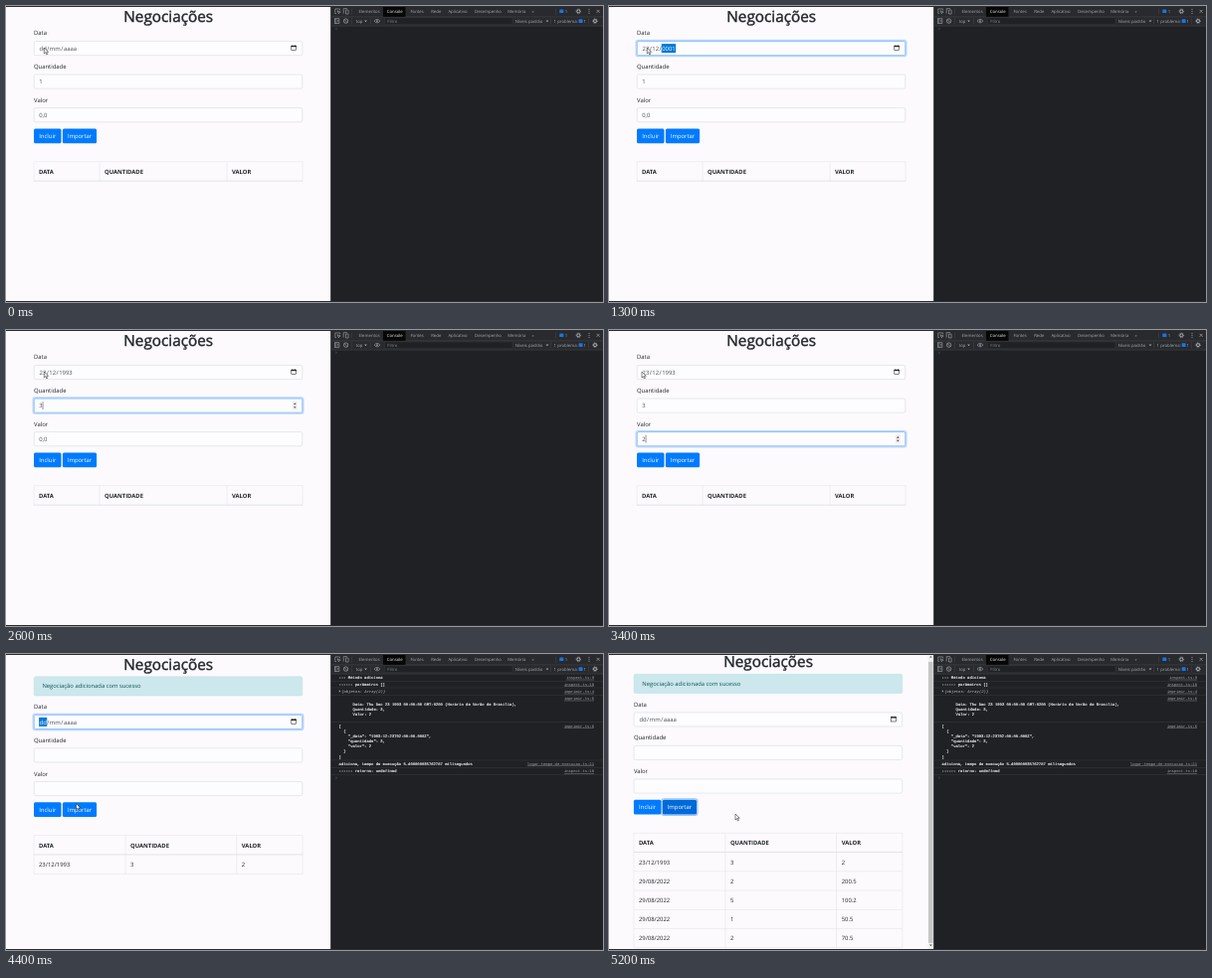
These frames come from a looping animation (600 by 298 pixels, 5.3 s). An HTML page:

```html
<!DOCTYPE html>
<html lang="pt-BR">
<head>
<meta charset="utf-8">
<title>Negociações</title>
<style>
  html, body { margin: 0; width: 100%; height: 100%; overflow: hidden; background: #fcfafd; }
  svg { display: block; width: 600px; height: 298px; }
  text { font-family: "Open Sans", "Noto Sans", sans-serif; white-space: pre; text-rendering: geometricPrecision; }
  .mono { font-family: "Liberation Mono", "DejaVu Sans Mono", monospace; }
  .log { stroke: #dcdee0; stroke-width: .18px; }
  .title { stroke: #212529; stroke-width: .4px; }
</style>
</head>
<body>
<svg id="stage" viewBox="0 0 600 298"></svg>
<script>
const LOOP = 5300, STEP = 100;
const stage = document.getElementById('stage');
const pen = document.createElement('canvas').getContext('2d');

// Time tables: the last entry whose time has come is in force.
const DATES = [
  [0, ['dd', 'mm', 'aaaa'], -1], [100, ['dd', 'mm', 'aaaa'], 0],
  [400, ['02', 'mm', 'aaaa'], 0], [600, ['23', 'mm', 'aaaa'], 1],
  [800, ['23', '01', 'aaaa'], 1], [900, ['23', '12', 'aaaa'], 2],
  [1100, ['23', '12', '0001'], 2], [1500, ['23', '12', '0019'], 2],
  [1700, ['23', '12', '0199'], 2], [1800, ['23', '12', '1993'], 2],
  [2000, ['23', '12', '1993'], -1], [4000, ['dd', 'mm', 'aaaa'], 0],
  [4600, ['dd', 'mm', 'aaaa'], -1]
];
// time, text, decoration
const AMOUNT = [[0, '1'], [2100, '1', 'selected'], [2400, '3', 'caret'], [2800, '3'], [4000, '']];
const PRICE = [[0, '0,0'], [2900, '0,0', 'selected'], [3400, '2', 'caret'], [3800, '2'], [4000, '']];
const FOCUS = [[0, ''], [100, 'date'], [2000, 'amount'], [2800, 'price'], [3950, 'date'], [4600, 'import']];
const ADD_FILL = [[0, '#007bff'], [3800, '#0069d9'], [3900, '#0062cc'], [4100, '#007bff']];
const IMPORT_FILL = [[0, '#007bff'], [4500, '#0069d9'], [4600, '#0062cc'], [4800, '#0069d9']];
const POINTER = [[0, 'arrow'], [3600, 'beam'], [3700, 'arrow'], [3800, 'hand'], [4000, 'beam'],
  [4200, 'arrow'], [4500, 'hand'], [4900, 'arrow']];
const PATH = [[0, 38.3, 42], [3300, 38.3, 42], [3400, 33, 42], [3500, 34, 60], [3600, 38, 95],
  [3700, 43, 122], [3800, 45, 129.8], [4100, 45, 129.8], [4500, 79, 157.5], [4700, 79, 157.5],
  [5200, 127, 161], [LOOP, 127, 161]];
const ROWS = [['23/12/1993', '3', '2'], ['29/08/2022', '2', '200.5'], ['29/08/2022', '5', '100.2'],
  ['29/08/2022', '1', '50.5'], ['29/08/2022', '2', '70.5']];

const clamp = v => Math.max(0, Math.min(1, v));
const at = (list, t) => list.filter(e => e[0] <= t).pop();

function along(path, t) {
  const i = Math.max(1, path.findIndex(p => p[0] > t));
  const a = path[i - 1], b = path[i], k = (t - a[0]) / (b[0] - a[0]);
  return [a[1] + (b[1] - a[1]) * k, a[2] + (b[2] - a[2]) * k];
}

const rect = (x, y, w, h, fill, more = '') =>
  `<rect x="${x}" y="${y}" width="${w}" height="${h}" fill="${fill}" ${more}/>`;
const text = (x, y, s, size = 5.9, fill = '#212529', more = '') =>
  `<text x="${x}" y="${y}" font-size="${size}" fill="${fill}" ${more}>${s}</text>`;
const path = (d, stroke, width = 0.6, fill = 'none') =>
  `<path d="${d}" stroke="${stroke}" stroke-width="${width}" fill="${fill}"/>`;
const circle = (x, y, r, stroke, width, fill = 'none') =>
  `<circle cx="${x}" cy="${y}" r="${r}" stroke="${stroke}" stroke-width="${width}" fill="${fill}"/>`;
const group = (x, y, body) => `<g transform="translate(${x} ${y})">${body}</g>`;

function textWidth(s) {
  pen.font = '100px "Open Sans", "Noto Sans", sans-serif';
  return pen.measureText(s).width * 0.059;
}

// How far the focus glow of a field has faded in or out.
function glow(name, t) {
  const i = FOCUS.findLastIndex(e => e[0] <= t);
  const k = clamp((t - FOCUS[i][0]) / 150);
  if (FOCUS[i][1] === name) return k;
  return i && FOCUS[i - 1][1] === name ? 1 - k : 0;
}

const halo = (x, y, w, h, k) =>
  rect(x - 0.8, y - 0.8, w + 1.6, h + 1.6, 'none', `rx="2" stroke="#007bff" stroke-width="1.3" opacity="${0.27 * k}"`);

function box(y, k) {
  return halo(28, y, 270, 14.6, k) +
    rect(28.2, y + 0.2, 269.6, 14.2, '#fdfcfe', 'rx="1.5" stroke="#ced4da" stroke-width=".5"') +
    rect(28.2, y + 0.2, 269.6, 14.2, 'none', `rx="1.5" stroke="#70b5ff" stroke-width=".7" opacity="${k}"`);
}

function dateField(t) {
  const [, parts, chosen] = at(DATES, t), y = 35.3;
  let x = 33.1, out = box(y, glow('date', t));
  parts.forEach((s, i) => {
    const w = textWidth(s) + 0.9, on = i === chosen;
    if (on) out += rect(x, y + 2.8, w, 9, '#0078d7');
    out += text(x + 0.45, y + 9.5, s, 5.9, on ? '#fff' : '#495057');
    x += w;
    if (i < 2) out += text(x, y + 9.5, '/', 5.9, '#495057');
    x += textWidth('/');
  });
  const icon = rect(286.8, y + 4.9, 4.9, 4.5, 'none', 'stroke="#222" stroke-width=".55"') +
    rect(286.6, y + 4.6, 5.3, 1.3, '#222') + rect(287.6, y + 4, 0.6, 0.8, '#222') + rect(290.3, y + 4, 0.6, 0.8, '#222');
  return out + icon;
}

function numberField(y, list, name, t, hover) {
  const [, s, mark] = at(list, t), w = textWidth(s);
  let out = box(y, glow(name, t));
  if (mark === 'selected') out += rect(33.2, y + 2.8, w, 9, '#0078d7');
  out += text(33.2, y + 9.5, s, 5.9, mark === 'selected' ? '#fff' : '#495057');
  if (mark === 'caret') out += rect(33.4 + w, y + 3.3, 0.5, 8, '#333');
  if (hover || at(FOCUS, t)[1] === name)
    out += rect(287.8, y + 3, 5, 8.6, '#ededee') +
      path(`M289 ${y + 6.3}l1.3 -1.6 1.3 1.6zM289 ${y + 8.4}l1.3 1.6 1.3 -1.6z`, 'none', 0, '#444');
  return out;
}

function button(x, w, label, fill, k) {
  return halo(x, 123.4, w, 14.8, k * 1.5) + rect(x, 123.4, w, 14.8, fill, 'rx="1.5"') +
    text(x + w / 2, 133, label, 5.9, '#fff', 'text-anchor="middle"');
}

function table(rows) {
  const top = 156.6, cols = rows.length ? [28, 120, 231.8, 298] : [28, 94, 222, 298];
  const head = 19.9, line = 19.15, h = head + rows.length * line;
  const rule = '#dee2e6';
  let out = '';
  for (const x of cols) out += rect(x - 0.2, top, 0.5, h, rule);
  out += rect(28, top, 270, 0.5, rule) + rect(28, top + head - 0.8, 270, 0.9, rule);
  ['DATA', 'QUANTIDADE', 'VALOR'].forEach((s, i) =>
    out += text(cols[i] + 5, top + 12.4, s, 5.85, '#212529', 'font-weight="700"'));
  rows.forEach((row, r) => {
    const y = top + head + r * line;
    row.forEach((s, i) => out += text(cols[i] + 5, y + 11.9, s));
    out += rect(28, y + line - 0.3, 270, 0.5, rule);
  });
  return out;
}

function page(t) {
  const added = t >= 4000, loaded = t >= 4700;
  const rows = loaded ? ROWS : added ? ROWS.slice(0, 1) : [];
  const scroll = 2.5 * clamp((t - 4900) / 300);
  const form = text(28, 29.4, 'Data') + dateField(t) +
    text(28, 63.2, 'Quantidade') + numberField(68.8, AMOUNT, 'amount', t) +
    text(28, 96.8, 'Valor') + numberField(102.4, PRICE, 'price', t, t === 4000 || t === 4100) +
    button(28, 27.5, 'Incluir', at(ADD_FILL, t)[1], 0) +
    button(56.9, 34.2, 'Importar', at(IMPORT_FILL, t)[1], glow('import', t)) + table(rows);
  let body = text(163.2, 15.8, 'Negociações', 15.3, '#212529', 'class="title" text-anchor="middle"');
  if (added)
    body += rect(28.2, 22.8, 269.6, 19.2, '#cce8ec', 'rx="1.5" stroke="#b9dfe5" stroke-width=".5"') +
      text(36.4, 34.4, 'Negociação adicionada com sucesso', 5.85, '#0c5460');
  body += group(0, added ? 25.8 : 0, form);
  let out = rect(0, 0, 327, 298, '#fcfafd') + group(loaded ? -3.1 : 0, -scroll, body);
  if (loaded)
    out += rect(320.6, 0, 5.4, 297, '#f1f1f1') + rect(321.1, 5.4 + scroll, 4.5, 283, '#c5c5c5') +
      path('M322 3.6l1.4 -1.7 1.4 1.7zM322 292.6l1.4 1.7 1.4 -1.7z', 'none', 0, '#555');
  return out;
}

const gear = (x, y) => circle(x, y, 1.5, '#b4b8bd', 0.9) +
  `<circle cx="${x}" cy="${y}" r="2.3" fill="none" stroke="#b4b8bd" stroke-width=".7" stroke-dasharray=".9 .9"/>`;

function toolbar() {
  const grey = '#a3a8ae', ui = (x, y, s, fill = grey) => text(x, y, s, 4.3, fill);
  const tabs = [[354.6, 'Elementos'], [406.4, 'Fontes'], [427.2, 'Rede'], [444.4, 'Aplicativo'],
    [471, 'Desempenho'], [504.2, 'Memória'], [528.5, '»']];
  return rect(327, 0, 273, 298, '#202124') + rect(327, 0, 273, 20, '#292a2d') +
    rect(327, 10.7, 273, 0.5, '#47494d') + rect(327, 19.8, 273, 0.5, '#47494d') +
    rect(379, 0.4, 22.5, 10.4, '#060606') + ui(382.7, 7, 'Console', '#eceef0') +
    tabs.map(([x, s]) => ui(x, 7, s)).join('') +
    path('M332 7.5h-1.2v-4.6h4.8v1.4M333 4.8l3.2 1.2 -1.3.5 -.5 1.3z', grey) +
    path('M339.2 7.6v-5h3.8M341.5 4h2.6v4h-2.6z', grey) +
    rect(347.5, 2.5, 0.4, 6, '#4c4e52') + rect(552.3, 2.5, 0.4, 6, '#4c4e52') +
    rect(556.3, 3.4, 4, 3.6, '#1a73e8', 'rx=".5"') + ui(561.7, 7, '1') +
    gear(575.3, 5.3) + [3.3, 5.3, 7.3].map(y => circle(586, y, 0.55, 'none', 0, grey)).join('') +
    path('M593.6 3.8l3 3M596.6 3.8l-3 3', grey, 0.7) +
    rect(330.3, 12.8, 4.6, 4.6, 'none', `stroke="${grey}" stroke-width=".6"`) +
    path('M331.8 12.8v4.6M333 14l1.2 1.1 -1.2 1.1', grey, 0.5) +
    circle(341.6, 15.1, 2.2, grey, 0.7) + path('M340.1 13.6l3 3', grey, 0.7) +
    rect(347.5, 12.3, 0.4, 6, '#4c4e52') + ui(351.7, 16.6, 'top') +
    path('M360.2 14.5h2.6l-1.3 1.7z', 'none', 0, grey) + rect(366.5, 12.3, 0.4, 6, '#4c4e52') +
    path('M370 15.1q3 -3.6 6 0q-3 3.6 -6 0z', grey) + circle(373, 15.1, 0.9, 'none', 0, grey) +
    rect(380.5, 11.9, 128.5, 6.8, '#202124', 'stroke="#3c3d40" stroke-width=".4"') + ui(383.2, 16.6, 'Filtro', '#85898f') +
    ui(511.8, 16.6, 'Níveis padrão') + path('M542.6 14.4h2.8l-1.4 1.8z', 'none', 0, grey) +
    rect(547.5, 12.3, 0.4, 6, '#4c4e52') + ui(550.6, 16.6, '1 problema:') +
    rect(575.6, 13.3, 4, 3.6, '#1a73e8', 'rx=".5"') + ui(580.6, 16.6, '1') +
    rect(585, 12.3, 0.4, 6, '#4c4e52') + gear(592, 15.1);
}

// y, indent in characters, text, link
const LOG = [
  [24.8, 0, '--- Método adiciona', 'inspect.ts:9'],
  [31.5, 0, '------ parâmetros []', 'inspect.ts:10'],
  [38.8, 1, '', 'imprimir.ts:4'],
  [45.8, 0, '', 'imprimir.ts:6'],
  [51.7, 6, 'Data: Thu Dec 23 1993 00:00:00 GMT-0200 (Horário de Verão de Brasília),'],
  [56.8, 6, 'Quantidade: 3,'],
  [61.9, 6, 'Valor: 2'],
  [73.5, 0, '[', 'imprimir.ts:6'],
  [78.7, 2, '{'],
  [83.9, 4, '"_data": "1993-12-23T02:00:00.000Z",'],
  [89.1, 4, '"quantidade": 3,'],
  [94.2, 4, '"valor": 2'],
  [99.3, 2, '}'],
  [104.5, 0, ']'],
  [111.5, 0, 'adiciona, tempo de execução 5.400000035762787 milisegundos', 'logar-tempo-de-execucao.ts:21'],
  [119.1, 0, '------ retorno: undefined', 'inspect.ts:10']
];

function devtools(t) {
  const prompt = y => path(`M331.2 ${y - 1.2}l1.2 1.2 -1.2 1.2`, '#3c70c4', 0.5);
  let out = toolbar();
  if (t < 4000) return out + prompt(22.8);
  for (const [y, indent, s, link] of LOG) {
    out += text(334.6 + indent * 2.33, y, s, 3.87, '#dcdee0', 'class="mono log"');
    if (link) out += text(591, y, link, 3.87, '#a0a4a9', 'class="mono" text-anchor="end" text-decoration="underline"');
  }
  out += path('M334.8 36.1l1.5 1.3 -1.5 1.3z', 'none', 0, '#9aa0a6') +
    text(337.2, 38.8, '{objetos: Array(2)}', 3.87, '#c3c6ca', 'class="mono" font-style="italic"');
  for (const y of [27, 33.8, 41, 68.6, 106.8, 114.2, 121.6]) out += rect(327, y, 273, 0.4, '#3d3f43');
  return out + prompt(124.6);
}

function pointer(t) {
  const [x, y] = along(PATH, t), kind = at(POINTER, t)[1];
  const click = t >= 4600 ? t - 4600 : t - 3800;
  let out = '';
  if ((t >= 3800 && t <= 4100) || (t >= 4600 && t <= 4800))
    out += circle(x, y, 5 + 8 * clamp(click / 145), '#e0636b', 0.9, 'rgba(255,255,255,.12)');
  const shapes = {
    arrow: path('M0 0v6l1.4 -1.3 1 2.2 1 -.4 -1 -2.2h1.9z', '#111', 0.5, '#fff'),
    beam: path('M-1 -2.7h2M0 -2.7v5.4M-1 2.7h2', '#444', 0.5),
    hand: path('M-.5 .4q.6 -.8 1.1 0v2.6l2.2 .5q.8 .3 .6 1.2l-.5 2.5h-3.2l-1.9 -2.7q.2 -.8 1.7 .2z', '#111', 0.5, '#fff')
  };
  return out + group(x, y, shapes[kind]);
}

function draw(t) {
  const edge = '#2b2b30';
  stage.innerHTML = page(t) + devtools(t) + rect(326, 0, 1, 298, '#47484c') +
    rect(0, 0, 600, 1, edge) + rect(0, 297, 600, 1, edge) + pointer(t);
}

const start = performance.now();
let shown = -1;
function tick() {
  const t = Math.floor(((performance.now() - start) % LOOP) / STEP) * STEP;
  if (t !== shown) draw(shown = t);
  requestAnimationFrame(tick);
}
tick();
</script>
</body>
</html>
```
